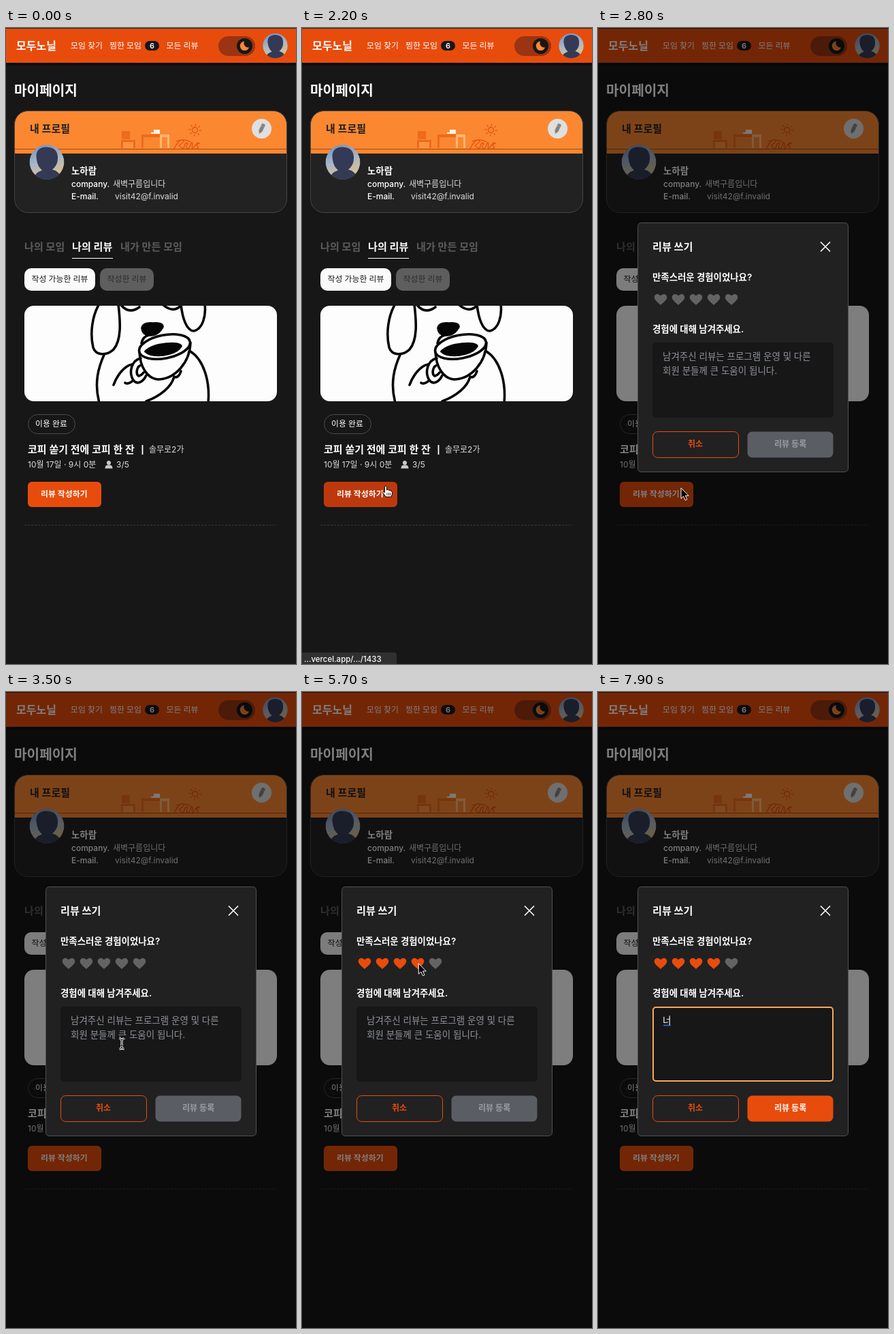
These frames come from a looping animation (426 px wide and 932 px high, 8000 ms). An HTML page:

```html
<!DOCTYPE html>
<html lang="ko">
<head>
<meta charset="utf-8">
<style>
  html, body { margin: 0; width: 100%; height: 100%; overflow: hidden; background: #171717; }
  svg { display: block; width: 426px; height: 932px; }
  text { font-family: Inter, "Noto Sans CJK KR", "Noto Sans CJK", sans-serif; white-space: pre; }
</style>
</head>
<body>
<svg viewBox="0 0 426 932">
  <defs>
    <linearGradient id="sky" x1="0" y1="0" x2=".3" y2="1">
      <stop offset="0" stop-color="#6d8fc4"/>
      <stop offset=".55" stop-color="#a9b6c8"/>
      <stop offset="1" stop-color="#d9c38e"/>
    </linearGradient>
    <linearGradient id="drop" x2="0" y2="1">
      <stop offset="0" stop-color="#050505"/>
      <stop offset="1" stop-color="#171717"/>
    </linearGradient>
    <clipPath id="round"><circle r="25.5"/></clipPath>
    <clipPath id="card"><rect x="12.5" y="121.5" width="400" height="149" rx="20"/></clipPath>
    <clipPath id="photo"><rect x="27" y="407" width="371" height="140" rx="14"/></clipPath>
    <g id="avatar" clip-path="url(#round)">
      <circle r="25.5" fill="url(#sky)"/>
      <path d="M-21 27Q-18 15-7 12Q-14 6-15-4Q-18-20-3-22Q15-23 16-8Q17 4 8 11Q19 13 23 27Z" fill="#343a55"/>
    </g>
    <path id="heart" d="M0 8C-3 5-9.3 1-9.3-3.2C-9.3-8.6-2.8-9.8 0-5.4C2.8-9.8 9.3-8.6 9.3-3.2C9.3 1 3 5 0 8Z"/>
    <path id="bar" d="M-3.5-7.5Q0-7.5 0-5Q0-7.5 3.5-7.5M0-5V5M-3.5 7.5Q0 7.5 0 5Q0 7.5 3.5 7.5M-2 2.5H2"/>
  </defs>

  <g id="page">
    <rect width="426" height="932" fill="#171717"/>
    <rect y="51" width="426" height="5" fill="url(#drop)"/>
    <rect width="426" height="51" fill="#e84c0d"/>
    <rect width="426" height="1" fill="#2b2b2b"/>
    <rect x="204" y="19" width="21" height="14" rx="7" fill="#171717"/>
    <rect x="312" y="12" width="54" height="29" rx="14.5" fill="#9a3412"/>
    <circle cx="350.5" cy="26.5" r="11.5" fill="#171717"/>
    <path d="M350 19.5A6.8 6.8 0 1 0 357 28.500A6.5 6.5 0 0 1 350 19.500Z" fill="#fb8731"/>
    <use href="#avatar" transform="translate(395.5 26) scale(.72)"/>

    <g clip-path="url(#card)">
      <rect x="12" y="121" width="401" height="150" fill="#222"/>
      <rect x="12" y="121" width="401" height="63" fill="#fb8731"/>
      <path d="M12 177.5H413" stroke="#a9490e"/>
      <g fill="#ee6a1c">
        <path d="M170 151h12v12h-12zM169 164h21v12h-3v-9h-15v9h-3zM199 156h28v4h-25v16h-3z"/>
        <path d="M226 156h14v20h-3v-16h-8v16h-3z" fill="#ffb774"/>
        <path d="M172 167h15v9h-15z" fill="#ffa55a" opacity=".4"/>
      </g>
      <path d="M217 149h9v6h-13v-2h4z" fill="#fff3e2"/>
      <g fill="none" stroke="#e4500f" stroke-width="1.3" stroke-linecap="round">
        <circle cx="277.5" cy="149.5" r="4"/>
        <circle cx="277.5" cy="149.5" r="7.6" stroke-width="3" stroke-dasharray="1.2 4.77" stroke-linecap="butt"/>
        <path d="M247 177Q252 166 258 164Q265 164 257 170Q251 173 261 177Q263 166 267 169Q262 178 269 176Q273 165 274 169Q272 180 276 175Q281 166 284 169Q277 172 282 174Q284 177 278 177M250 166Q263 162 271 167"/>
      </g>
    </g>
    <rect x="12.5" y="121.5" width="400" height="149" rx="20" fill="none" stroke="#444"/>
    <use href="#avatar" transform="translate(60 196.5)"/>
    <circle cx="375.5" cy="147.5" r="14.5" fill="#dfdfdf"/>
    <path d="M-2.6-6.5q0-1 1-1h3.2q1 0 1 1V4L0 8L-2.6 4ZM-2.6-3.7h5.2" transform="translate(375.5 147.5) rotate(25)" fill="#808080" stroke="#aaa" stroke-width=".6"/>

    <path d="M97 337.5H157" stroke="#fff"/>
    <rect x="27" y="352" width="104" height="33" rx="10" fill="#fafafa"/>
    <rect x="138" y="352" width="79" height="33" rx="10" fill="#5e5e5e"/>

    <g clip-path="url(#photo)">
      <rect x="27" y="407" width="371" height="140" fill="#fdfdfd"/>
      <g fill="none" stroke="#050505" stroke-width="3.6" stroke-linecap="round" stroke-linejoin="round">
        <path d="M136 406C127 422 123 447 128 468C132 481 149 480 158 471C170 457 168 430 165 405"/>
        <path d="M169 406Q181 420 196 409M231 406Q245 418 257 407"/>
        <path d="M257 405C259 424 265 444 276 444C289 441 294 422 292 405"/>
        <path d="M200 440Q201 432 216 433Q230 432 230 438Q223 451 210 450Q201 449 200 440Z" fill="#050505"/>
        <path d="M210 450Q201 452 199 462"/>
        <ellipse cx="233" cy="467" rx="38" ry="17" transform="rotate(-11 233 467)" fill="#fdfdfd"/>
        <path d="M205 474Q214 465 235 463Q254 461 257 466Q252 476 231 479Q212 481 205 474Z" fill="#050505"/>
        <path d="M196 475C197 496 207 514 224 515C249 514 270 490 271 461"/>
        <path d="M198 484C184 487 180 505 187 516C193 524 202 518 206 509M199 494C192 495 190 507 195 510Q199 509 202 505"/>
        <path d="M185 493C174 495 163 509 158 523M187 516Q180 523 175 520"/>
        <path d="M144 479C136 497 129 520 137 549M271 474C290 486 300 517 297 549"/>
        <path d="M247 511C243 526 227 539 206 547M247 511Q253 514 257 503"/>
      </g>
    </g>

    <rect x="32.5" y="566.5" width="69" height="28" rx="14" fill="none" stroke="#4a4a4a"/>
    <path d="M200.5 611V625" stroke="#fff" stroke-width="1.8"/>
    <path d="M151 634a3.1 3.1 0 1 1-.01 0ZM145.5 645.5q0-5 4-5h3q4 0 4 5z" fill="#c9c9c9"/>
    <rect id="write" x="32" y="665" width="108" height="37" rx="6"/>
    <path d="M27 728.5H398" stroke="#3a3a3a" stroke-dasharray="3 2"/>
  </g>

  <g id="status">
    <path d="M0 915H135q4 0 4 4V932H0Z" fill="#303030"/>
  </g>
  <rect id="shade" width="426" height="932"/>

  <g id="modal">
    <rect x="58.5" y="285.5" width="309" height="365" rx="5" fill="#212121" stroke="#505050"/>
    <path d="M327 313.5L341 327.5M341 313.5L327 327.5" stroke="#fff" stroke-width="1.6"/>
    <g id="hearts"></g>
    <rect id="area" x="81" y="462" width="264" height="108" rx="4" fill="#171717" stroke-width="2"/>
    <rect x="80.5" y="591.5" width="126" height="38" rx="7" fill="none" stroke="#e84c0d"/>
    <rect id="submit" x="219.5" y="591.5" width="126" height="38" rx="7"/>
    <g id="hint"></g>
    <path id="caret" d="M95.5 473V489" stroke="#fff"/>
    <path id="compose" d="M96 488.5H107" stroke="#2f73e8" stroke-width="1.5"/>
  </g>

  <g id="arrow">
    <path d="M0 0V15.5L3.6 12.2L6.2 18L8.8 16.9L6.3 11.3H11Z" fill="#000" stroke="#fff"/>
  </g>
  <g id="hand">
    <path d="M-1.5 1.5Q-1.5 0 0 0T1.5 1.5V6Q4 4.6 4.5 6.5Q7 5.6 7.2 7.5Q9.5 7 9.5 9.5V12Q9 14 8 16H0Q-2 12-5 9.5Q-4.5 7.5-1.5 9.5Z" fill="#fff" stroke="#000"/>
    <path d="M2 10V14M4.5 10V14M6.8 10V14" stroke="#000" stroke-width=".8"/>
  </g>
  <g id="beam" fill="none">
    <use href="#bar" stroke="#fff" stroke-width="3"/>
    <use href="#bar" stroke="#000"/>
  </g>
</svg>
<script>
const $ = id => document.getElementById(id);
const ORANGE = '#e84c0d', GREY = '#636363';

function add(parent, tag, attrs) {
  const el = document.createElementNS('http://www.w3.org/2000/svg', tag);
  for (const k in attrs) el.setAttribute(k, attrs[k]);
  return $(parent).appendChild(el);
}
// Places text by its left edge and vertical centre.
function label(parent, x, cy, str, size, weight = 400, fill = '#fff') {
  const el = add(parent, 'text', { x, y: cy + size * .37, 'font-size': size, 'font-weight': weight, fill });
  el.textContent = str;
  return el;
}

[
  [15, 26, '모두노닐', 16, 900],
  [95, 26, '모임 찾기', 11.9, 500],
  [152, 26, '찜한 모임', 11.9, 500],
  [211, 26, '6', 11, 600],
  [235.5, 26, '모든 리뷰', 11.9, 500],
  [12, 91.5, '마이페이지', 20.2, 600],
  [35, 147, '내 프로필', 15, 600, '#1e1e1e'],
  [96, 209, '노하람', 13.4, 600],
  [96, 229, 'company.', 12, 500],
  [157, 229, '새벽구름입니다', 12, 400, '#ddd'],
  [96, 247, 'E-mail.', 12, 500],
  [160, 247, 'visit42@f.invalid', 12, 400, '#ddd'],
  [27, 320.5, '나의 모임', 15.1, 600, '#5c5c5c'],
  [97, 320.5, '나의 리뷰', 15.1, 600],
  [168, 320.5, '내가 만든 모임', 15.1, 600, '#5c5c5c'],
  [37.5, 368, '작성 가능한 리뷰', 11.9, 500, '#171717'],
  [148.5, 368, '작성한 리뷰', 11.9, 500, '#2b2b2b'],
  [43, 580, '이용 완료', 11.9, 500],
  [32, 617.5, '코피 쏟기 전에 코피 한 잔', 15, 600],
  [210, 618, '솔무로2가', 12, 400, '#ddd'],
  [32, 640, '10월 17일 · 9시 0분', 12, 400, '#ddd'],
  [162, 640, '3/5', 12, 400, '#ddd'],
  [51, 683, '리뷰 작성하기', 11.9, 600]
].forEach(a => label('page', ...a));

label('status', 3, 924.5, '…vercel.app/…/1433', 11.5, 500);
label('modal', 80, 320.5, '리뷰 쓰기', 15.1, 600);
label('modal', 80, 365, '만족스러운 경험이었나요?', 13.4, 600);
label('modal', 80, 441, '경험에 대해 남겨주세요.', 13.4, 600);
label('modal', 132, 610, '취소', 12, 600, ORANGE);
label('hint', 95, 481, '남겨주신 리뷰는 프로그램 운영 및 다른', 13.5, 400, '#8f929a');
label('hint', 95, 502, '회원 분들께 큰 도움이 됩니다.', 13.5, 400, '#8f929a');
const submitText = label('modal', 259, 610, '리뷰 등록', 12, 600);
const typed = label('modal', 95, 481, '', 13.5);
const hearts = [0, 1, 2, 3, 4].map(i =>
  add('hearts', 'use', { href: '#heart', x: 92 + 26 * i, y: 398 }));

// Pointer stops: time, x, y.
const path = [
  [1000, 215, 935], [1650, 123, 674], [2200, 123, 671], [2600, 122, 674], [2800, 122, 674],
  [3400, 170, 516], [3700, 170, 514], [4300, 150, 398], [4700, 183, 390], [5200, 188, 395],
  [5500, 172, 397], [5800, 171, 398], [6250, 186, 491], [8000, 186, 491]
];
const clamp = v => Math.max(0, Math.min(1, v));

function pointer(t) {
  const i = Math.max(1, path.findIndex(p => p[0] > t));
  const [a, b] = [path[i - 1], path[i]];
  const u = clamp((t - a[0]) / (b[0] - a[0])), e = u * u * (3 - 2 * u);
  return [a[1] + (b[1] - a[1]) * e, a[2] + (b[2] - a[2]) * e];
}
const show = (id, on) => $(id).style.display = on ? '' : 'none';
const fill = (el, c) => el.setAttribute('fill', c);

function render(t) {
  const [x, y] = pointer(t);
  const open = t >= 2450;
  const onButton = !open && x > 32 && x < 140 && y > 665 && y < 702;
  const onArea = t > 2800 && x > 80 && x < 345 && y > 462 && y < 570;
  const focused = t >= 6350;
  const text = t < 7600 ? '' : t < 7800 ? 'ㄴ' : '너';

  const kind = t < 1000 || text ? '' : onArea ? 'beam' : onButton ? 'hand' : 'arrow';
  for (const id of ['arrow', 'hand', 'beam']) show(id, id === kind);
  if (kind) $(kind).setAttribute('transform', `translate(${x} ${y})`);

  fill($('write'), onButton ? '#bd390d' : ORANGE);
  $('status').style.opacity = open ? 0 : clamp((t - 1650) / 150);
  $('shade').style.opacity = .5 * clamp((t - 2450) / 100);

  const p = clamp((t - 2500) / 300);
  $('modal').style.opacity = p;
  $('modal').setAttribute('transform', `translate(0 ${18 * (1 - p)})`);

  const hover = open && y > 386 && y < 411 ? Math.floor((x - 79) / 26 + 1e-6) + 1 : 0;
  const rating = t >= 5500 ? 4 : hover;
  hearts.forEach((h, i) => fill(h, i < rating ? ORANGE : GREY));

  $('area').setAttribute('stroke', focused ? '#fda65a' : '#171717');
  show('caret', focused && !text && (t - 6350) % 1000 < 500);
  show('hint', !text);
  show('compose', text);
  typed.textContent = text;
  fill($('submit'), text ? ORANGE : '#5b5d65');
  fill(submitText, text ? '#fff' : '#9b9da4');
}

function tick() {
  render(performance.now() % 8000);
  requestAnimationFrame(tick);
}
tick();
</script>
</body>
</html>
```
